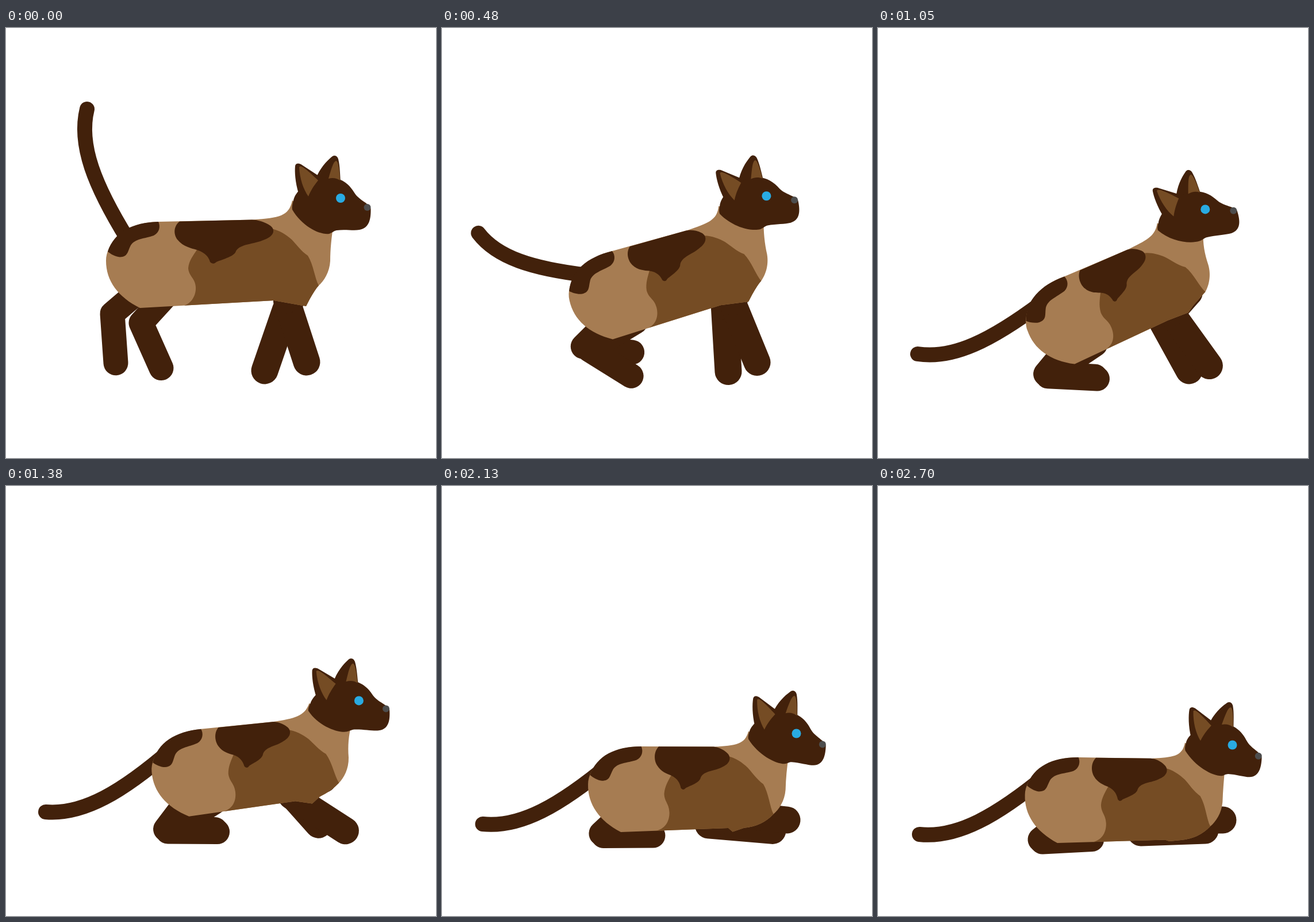
Animation of 748 by 748 pixels, one loop 3.6 s. Source, as an HTML page with a canvas:

```html
<!DOCTYPE html>
<html lang="en">
<head>
<meta charset="utf-8">
<title>Cat lying down</title>
<style>
html, body { margin: 0; width: 100%; height: 100%; overflow: hidden; background: #fff; }
canvas { display: block; }
</style>
</head>
<body>
<canvas id="stage" width="748" height="748"></canvas>
<script>
const ctx = document.getElementById('stage').getContext('2d');
const LOOP = 3600, STEP = 30;
const SIT = 900, LOW = 1860, END = 2700;
const DARK = '#42210b', BROWN = '#754c24', TAN = '#a67c52';

// Joints of each pose; knee and feet also carry the angle of their limb
const POSES = [
  { at: 0, rear: [233, 487], chest: [544, 448], eye: [582, 296],
    knee: [185, 497, 4], backFoot: [450, 596, 109], frontFoot: [523, 581, 72] },
  { at: SIT, rear: [353, 589], chest: [565, 433], eye: [549, 289],
    knee: [298, 604, 4], backFoot: [540, 599, 67], frontFoot: [570, 582, 64] },
  { at: 1440, rear: [314, 573], chest: [581, 527], eye: [622, 384],
    knee: [275, 596, 0], backFoot: [544, 588, 46], frontFoot: [593, 602, 29] },
  { at: LOW, rear: [310, 580], chest: [575, 546], eye: [616.5, 407],
    knee: [271, 592, 3], backFoot: [582, 600, 13], frontFoot: [600, 581, 13] },
  { at: END, rear: [312, 621], chest: [578, 592], eye: [616.5, 450.5],
    knee: [282, 615, -3], backFoot: [569, 599, -2], frontFoot: [600, 581, 0] },
];
const STAND = POSES[0];

// Shapes in the standing pose
const BODY = `M233 487 C195 468 174 440 174 405 C174 375 205 338 265 337 L430 333.5
  C475 330 492 328 498 300 L570 340 C566 365 564 385 564 405 C563 425 553 440 544 448`;
const SADDLE = `C325 478 331 462 330 450 C329 435 318 432 317 418 C318 405 326 395 332 386
  L370 355 L460 349 C475 351 488 360 497 368 C505 376 513 388 525 396 C535 412 537 435 544 448`;
const HIP_PATCH = `M177 389 C188 355 220 338 265 337 C269 345 267 356 257 361 C240 367 225 366 217 378
  C211 390 212 398 198 398.5 C190 398 182 393 177 389Z`;
const BACK_PATCH = `M302 336.5 C290 346 292 361 299 369 C308 380 322 383 332 386 C348 391 353 400 355 407
  C359 411 363 410 366 407 C378 402 398 397 400 388 C408 375 430 377 450 368
  C468 361 468 350 460 344 C450 337 438 334 428 333.5Z`;
const EARS = `M509 288 C503 268 502 250 503 240 C504 235 508 235 513 237 L545 258 L550 275 L520 290Z
  M541 257 C550 238 562 228 568 223 C573 220 577 224 578 228 C581 240 581 255 582 268 L550 272Z`;
const INNER_EARS = `M510 242 C512 238 520 243 543 265 C535 275 530 283 526 293 C517 280 511 262 510 242Z
  M561 262 C566 245 569 233 574 231 C578 231 580 245 581 265 C575 261 568 260 561 262Z`;
const FACE = `M498 316 C515 345 545 360 562 358 C568 356 570 353 575 352 C590 350 605 353 615 351
  C632 348 635 332 634.5 314 C632 305 615 300 607 288 C598 273 586 261 563 260
  C555 260 549 261 543 264 C520 270 503 285 500 300 C498 306 497 312 498 316Z`;

const clamp = v => Math.min(1, Math.max(0, v));
const smooth = v => clamp(v) ** 2 * (3 - 2 * clamp(v));
const easeOut = v => 1 - (1 - clamp(v)) ** 2;
const rad = deg => deg * Math.PI / 180;
const mix = (a, b, k) => a.map((v, i) => v + (b[i] - v) * k);
const polar = ([x, y], deg, r) => [x + r * Math.cos(rad(deg)), y + r * Math.sin(rad(deg))];

function poseAt(t) {
  const next = POSES.findIndex(p => p.at > t);
  if (next < 0) return POSES[POSES.length - 1];
  const a = POSES[next - 1], b = POSES[next];
  let k = (t - a.at) / (b.at - a.at);
  if (b.at === END) k = easeOut(k);
  const pose = {};
  for (const joint in a) if (joint !== 'at') pose[joint] = mix(a[joint], b[joint], k);
  return pose;
}

// Slope of the line from hip to chest, in degrees
const slope = ({ rear, chest }) =>
  Math.atan2(chest[1] - rear[1], chest[0] - rear[0]) * 180 / Math.PI;

function bone([ax, ay], [x, y], deg) {
  const c = Math.cos(rad(deg)), s = Math.sin(rad(deg));
  return ([px, py]) => [x + (px - ax) * c - (py - ay) * s, y + (px - ax) * s + (py - ay) * c];
}

function fill(color, d) {
  ctx.fillStyle = color;
  ctx.fill(new Path2D(d));
}

function stroke(width, d) {
  ctx.lineWidth = width;
  ctx.stroke(new Path2D(d));
}

function dot(color, [x, y], r) {
  ctx.fillStyle = color;
  ctx.beginPath();
  ctx.arc(x, y, r, 0, 2 * Math.PI);
  ctx.fill();
}

// The tip swings down in an arc, then rests; the bow keeps its shape along the chord
function drawTail(t, base, lie) {
  const k = clamp(t / 820);
  const tip = [
    69 + 72 * (1 - k) ** 3.3 - 10 * Math.sin(Math.PI * k) + 3 * lie,
    141 + 426 * k ** 1.27 + 39 * lie,
  ];
  const dx = base[0] - tip[0], dy = base[1] - tip[1];
  const bow = (along, side) => [tip[0] + dx * along - dy * side, tip[1] + dy * along + dx * side];
  stroke(26, `M${tip}C${bow(0.23, 0.14)} ${bow(0.55, 0.115)} ${base}`);
}

// The far shin folds at once, the near one follows
function drawHindLegs(t, pose, rear) {
  const k = clamp(t / SIT), apart = (1 - k) ** 2.5;
  const [x, y, deg] = pose.knee;
  const leg = (hip, knee, angle) => stroke(43, `M${rear(hip)}L${knee}L${polar(knee, angle, 86)}`);
  leg([240, 450], [x, y], deg + 82 * apart ** 1.8);
  leg([278, 466], [x + 4 + 46 * apart, y + 4 + 12 * apart], deg + 62 * (1 - smooth(k)));
}

function drawFrontLeg([x, y, deg], shoulder) {
  const elbow = polar([x, y], deg, -112);
  stroke(47, `M${x},${y}L${elbow}`);
  stroke(44, `M${elbow}L${shoulder}`);
}

function draw(t) {
  const pose = poseAt(t);
  const lie = easeOut((t - LOW) / (END - LOW));
  const crouch = clamp((t - SIT) / (LOW - SIT));
  const pitch = 0.87 * (slope(pose) - slope(STAND)) + crouch;
  const tilt = 0.87 * pitch + 2.5 * smooth(crouch);
  const rear = bone(STAND.rear, pose.rear, pitch);
  const chest = bone(STAND.chest, pose.chest, pitch);
  const head = bone(STAND.eye, pose.eye, tilt);

  // Blend the three bones along the spine and up the neck
  const skin = p => {
    const spine = clamp((p[0] - 275) / 190);
    const neck = smooth(((p[0] - 498) * 0.476 - (p[1] - 316) * 0.878 + 25) / 65);
    return mix(mix(rear(p), chest(p), spine), head(p), neck);
  };
  const warp = d => d.replace(/([\d.]+) ([\d.]+)/g, (_, x, y) => skin([+x, +y]).join(' '));

  ctx.fillStyle = '#fff';
  ctx.fillRect(0, 0, 748, 748);
  ctx.lineCap = ctx.lineJoin = 'round';
  ctx.strokeStyle = DARK;

  drawTail(t, rear([212, 368]), lie);
  drawHindLegs(t, pose, rear);
  drawFrontLeg(pose.backFoot, chest([518, 441]));
  drawFrontLeg(pose.frontFoot, chest([518, 441]));

  // The belly corner slides back with the elbows
  const [cx, cy] = pose.chest, bx = -22 - 49 * crouch, by = 36 - 10 * lie;
  const groin = skin([466, 474]);
  const belly = `Q${cx + bx * 0.28} ${cy - bx * 0.3} ${cx + bx * 0.72} ${cy + 24}
    L${cx + bx} ${cy + by} L${groin}Z`;
  fill(TAN, warp(BODY) + belly);
  fill(BROWN, `M${mix(pose.rear, groin, 0.33)}` + warp(SADDLE) + belly);
  fill(DARK, warp(HIP_PATCH));
  fill(DARK, warp(BACK_PATCH));

  fill(DARK, warp(EARS));
  fill(DARK, warp(FACE));
  fill(BROWN, warp(INNER_EARS));
  dot('#29abe2', skin(STAND.eye), 8);
  dot('#4d4d4d', skin([628.5, 312]), 6);
}

function frame() {
  const now = performance.now() % LOOP;
  draw(Math.floor(now / STEP) * STEP);
  requestAnimationFrame(frame);
}
frame();
</script>
</body>
</html>
```
